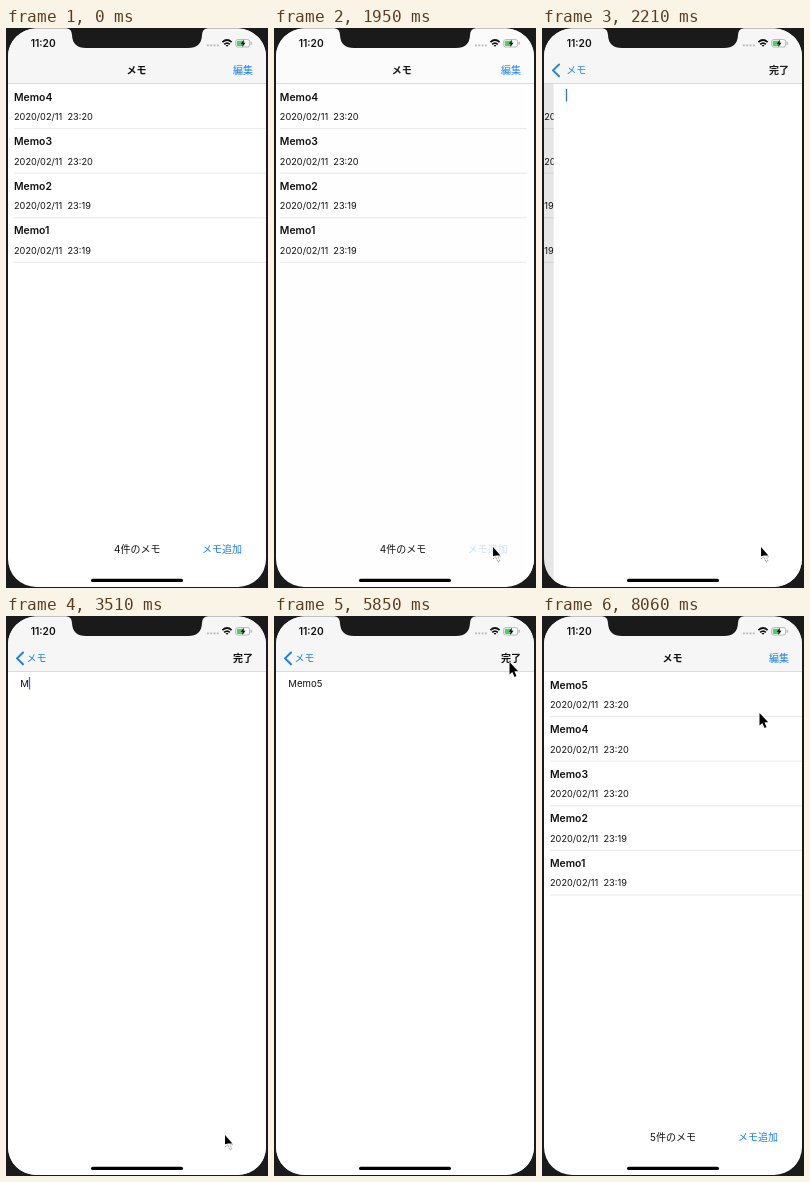
These frames come from a looping animation (262 px wide and 560 px high, 8710 ms). An HTML page:

```html
<!DOCTYPE html>
<html lang="ja">
<head>
<meta charset="utf-8">
<title>メモ</title>
<style>
html, body { margin: 0; width: 100%; height: 100%; overflow: hidden; background: #1a1a1a; }
svg { display: block; width: 100%; height: 100%; }
text { font: 10px Inter, "Noto Sans CJK JP", "Noto Sans CJK", sans-serif; fill: #111; white-space: pre; }
.bold { font-weight: 600; }
.blue { fill: #1480e8; }
</style>
</head>
<body>
<svg viewBox="0 0 262 560">
  <defs>
    <clipPath id="screen"><rect x="2" y=".5" width="258" height="558.5" rx="28"/></clipPath>
  </defs>
  <rect width="262" height="560" fill="#1a1a1a"/>
  <g clip-path="url(#screen)">
    <rect width="262" height="560" fill="#fff"/>
    <g id="list">
      <g id="rows"></g>
      <text id="count" x="108" y="524.5"></text>
      <text id="add" class="blue" x="196" y="524.5">メモ追加</text>
    </g>
    <rect id="dim" y="55" width="262" height="505"/>
    <g id="editor">
      <rect x="2" y="55" width="258" height="505" fill="#fff"/>
      <text id="typed" x="14.3" y="70.5" style="font-size:9.6px"></text>
      <rect id="caret" y="61" width="1.3" height="12.5" fill="#3970d6"/>
    </g>
    <rect id="bar" width="262" height="55.5"/>
    <path d="M0 55.5H262" stroke="#d2d2d2" stroke-width=".8"/>
    <text id="title" class="bold" y="46" text-anchor="middle">メモ</text>
    <text id="edit" class="blue" x="227" y="46">編集</text>
    <g id="back">
      <path d="M17 36.5L11 42.4L17 48.3" fill="none" stroke="#1480e8" stroke-width="2" stroke-linecap="round" stroke-linejoin="round"/>
      <text id="backText" class="blue" y="46" text-anchor="middle">メモ</text>
    </g>
    <text id="done" class="bold" x="227" y="46">完了</text>
    <rect x="85" y="550.8" width="92" height="3.2" rx="1.6" fill="#000"/>
  </g>
  <path d="M60 0Q66 1 66 7Q66.5 20 80 20H182Q195.5 20 196 7Q196 1 202 0Z" fill="#1a1a1a"/>
  <text class="bold" x="24.7" y="19" style="font-size:10.2px">11:20</text>
  <path d="M201 17.3H213" stroke="#b5b5b5" stroke-width="1.8" stroke-dasharray="1.8 1.5"/>
  <g fill="none" stroke="#111" stroke-width="1.7">
    <path d="M216.4 14.2Q221 9.8 225.6 14.2M218.2 16.3Q221 13.8 223.8 16.3"/>
    <path d="M219.6 17L221 19L222.4 17Z" fill="#111" stroke="none"/>
  </g>
  <rect x="229.7" y="11.6" width="14" height="7.4" rx="2" fill="#fff" stroke="#a5a5a5" stroke-width=".8"/>
  <rect x="230.8" y="12.7" width="7.5" height="5.2" rx="1" fill="#55cc6a"/>
  <path d="M238 11.8L234.6 15.8H236.7L236 19L239.6 14.8H237.4Z" fill="#111"/>
  <path d="M245.2 13.9V16.7" stroke="#a5a5a5"/>
  <g id="cursor">
    <path id="arrow" d="M0 0V12.6L2.8 10L5 15L7 14.1L4.9 9.2H8.7Z" fill="#000" stroke="#fff" stroke-width=".9" paint-order="stroke"/>
    <g id="faint">
      <path d="M0 0V9.2L3 8.4H7.4Z" fill="#000"/>
      <path d="M0 11.8L2.8 9.8L5 15L7 14.1L5 9.8H8.4" fill="none" stroke="#777" stroke-width=".8" stroke-dasharray="1.2 1"/>
    </g>
  </g>
</svg>
<script>
const LOOP = 8710, STEP = 130;
const PUSH = 1936, POP = 6640;
const NAMES = ["Memo5", "Memo4", "Memo3", "Memo2", "Memo1"];
const KEYS = [3510, 3640, 3900, 4030, 4160];
const PATH = [
  [130, 245, 534], [520, 241, 531], [910, 231, 525], [1300, 219, 519],
  [4680, 219, 519], [4940, 222, 440], [5200, 232, 268], [5460, 252, 120],
  [5720, 240, 52], [5850, 235.5, 46], [6110, 236, 41],
  [7410, 236, 41], [7800, 227, 70], [8060, 217.5, 97]
];
const ui = {};
document.querySelectorAll("svg [id]").forEach(el => ui[el.id] = el);

const set = (el, attrs) => { for (const k in attrs) el.setAttribute(k, attrs[k]); };
const show = (el, on) => set(el, { opacity: +on });
const shift = (el, x, y = 0) => set(el, { transform: `translate(${x} ${y})` });

// Critically damped spring, as in a navigation slide
function spring(ms) {
  if (ms <= 0) return 0;
  const k = ms * 0.0186, p = 1 - (1 + k) * Math.exp(-k);
  return p > 0.998 ? 1 : p;
}

function cursorAt(t) {
  const i = PATH.findIndex(p => p[0] > t);
  if (i < 0) return PATH[PATH.length - 1].slice(1);
  const a = PATH[Math.max(i - 1, 0)], b = PATH[i];
  const f = Math.max(0, (t - a[0]) / (b[0] - a[0]));
  return [a[1] + (b[1] - a[1]) * f, a[2] + (b[2] - a[2]) * f];
}

let total = 0;
function fillList(n) {
  if (n === total) return;
  total = n;
  ui.count.textContent = n + "件のメモ";
  ui.rows.innerHTML = NAMES.slice(-n).map((name, i) => {
    const y = 56 + i * 44.6, time = +name[4] > 2 ? "23:20" : "23:19";
    return `<text class="bold" x="8" y="${y + 16.5}" style="font-size:10.4px">${name}</text>
      <g style="font-size:9.2px"><text x="8" y="${y + 36}" style="font-size:9.2px">2020/02/11</text>
      <text x="61.5" y="${y + 36}" style="font-size:9.2px">${time}</text></g>
      <path d="M8 ${y + 44.6}H262" stroke="#e2e2e2" stroke-width=".8"/>`;
  }).join("");
}

function caretOn(t) {
  if (t < 2080 || t >= 5850) return false;
  if (t < KEYS[0]) return t < 2730 || t >= 3120;
  return t < KEYS[4] || (t - KEYS[4]) % 1040 < 560;
}

function draw(t) {
  const p = t < POP ? spring(t - PUSH) : 1 - spring(t - POP);
  const sliding = p > 0 && p < 0.9;

  fillList(t < POP - STEP ? 4 : 5);
  shift(ui.list, -76 * p);
  set(ui.add, { opacity: t >= 1690 && t < POP - STEP ? 0.22 : 1 });
  set(ui.dim, { opacity: 0.1 * p });

  const text = NAMES[0].slice(0, KEYS.filter(k => k <= t).length);
  ui.typed.textContent = text;
  shift(ui.editor, 258 * (1 - p));
  show(ui.editor, p > 0);
  set(ui.caret, { x: 14.2 + (text ? ui.typed.getComputedTextLength() : 0) });
  show(ui.caret, caretOn(t));

  const x = 130.5 - 100 * p;
  set(ui.bar, { fill: sliding ? "#fbfbfb" : "#f6f6f6" });
  set(ui.title, { x, opacity: Math.max(0, 1 - 1.5 * p) });
  set(ui.backText, { x });
  set(ui.back, { opacity: Math.max(0, 1.5 * p - 0.5) });
  set(ui.edit, { opacity: Math.max(0, 1 - 1.5 * p) });
  set(ui.done, {
    opacity: (t >= 6500 ? 0.4 : 1) * Math.max(0, 1.5 * p - 0.5),
    fill: text ? "#1480e8" : "#bcbcbc"
  });

  const resting = t >= 1300 && t <= 4680;
  show(ui.cursor, t >= PATH[0][0]);
  shift(ui.cursor, ...cursorAt(t));
  show(ui.arrow, !resting);
  show(ui.faint, resting);
}

const start = performance.now();
function tick() {
  const t = (performance.now() - start) % LOOP;
  draw(Math.floor(t / STEP) * STEP);
  requestAnimationFrame(tick);
}
tick();
</script>
</body>
</html>
```
